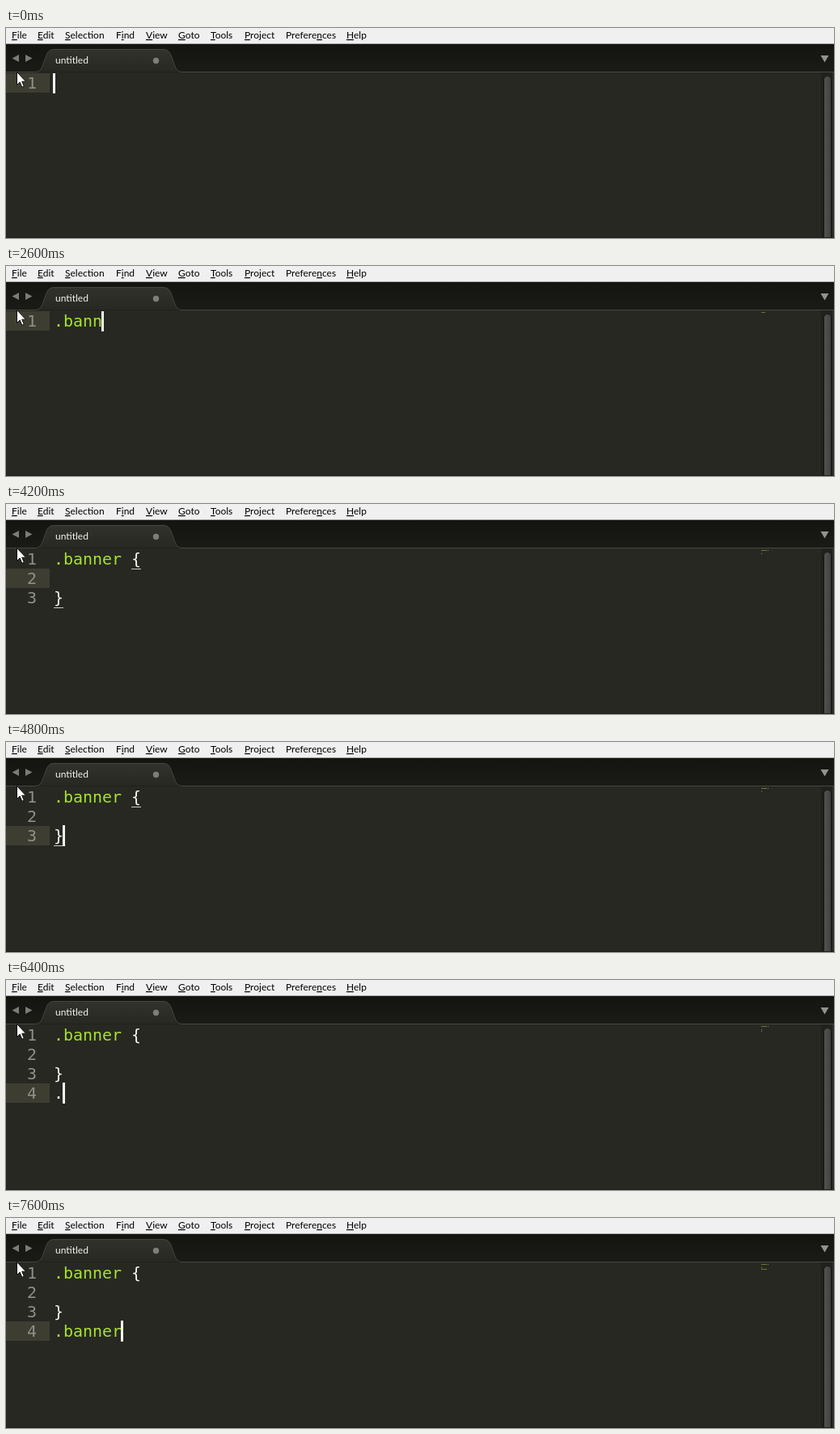
An HTML page that plays this animation: 1024 px wide and 260 px high, repeating every 8000 ms.

```html
<!DOCTYPE html>
<html>
<head>
<meta charset="utf-8">
<style>
html, body { margin: 0; width: 100%; height: 100%; overflow: hidden; background: #272822; }
svg { display: block; }
text { white-space: pre; }
.ui { font: 12px Lato, "Open Sans", sans-serif; }
.code { font: 20px "DejaVu Sans Mono", "Noto Sans Mono", monospace; }
</style>
</head>
<body>
<svg width="1024" height="260" viewBox="0 0 1024 260">
  <defs>
    <linearGradient id="strip" x2="0" y2="1">
      <stop stop-color="#141510"/><stop offset="1" stop-color="#1a1b16"/>
    </linearGradient>
    <linearGradient id="tab" x2="0" y2="1">
      <stop stop-color="#31322c"/><stop offset="1" stop-color="#272822"/>
    </linearGradient>
    <linearGradient id="thumb">
      <stop stop-color="#545552"/><stop offset="1" stop-color="#40413e"/>
    </linearGradient>
  </defs>
  <rect width="1024" height="19" fill="#f0f0f0"/>
  <rect y="19" width="1024" height="1" fill="#a0a0a0"/>
  <g id="menu" class="ui" fill="#000"></g>

  <rect y="20" width="1024" height="35" fill="url(#strip)"/>
  <path d="M0 54.500H36C44 54.500 45 47 48 39C51 31 52 26.500 60 26.500H194C202 26.500 203 31 206 39C209 47 210 54.500 218 54.500H1024" fill="url(#tab)" stroke="#45463f"/>
  <text class="ui" x="61" y="44" fill="#f4f4f0">untitled</text>
  <circle cx="185.500" cy="40.500" r="3.700" fill="#7d7e78"/>
  <path d="M16 33V42L7.500 37.500ZM24 33V42L32.500 37.500Z" fill="#7b7c77"/>
  <path d="M1007.500 34H1017.500L1012.500 42.500Z" fill="#92938e"/>

  <rect x="1008" y="55" width="16" height="205" fill="#20211c"/>
  <rect x="1011.500" y="59.500" width="9" height="220" rx="4" fill="url(#thumb)" stroke="#151612"/>
  <rect x="1022" y="55" width="2" height="205" fill="#2e2e32"/>
  <rect y="259" width="1024" height="1" fill="#1d1e19"/>

  <g id="editor"></g>
  <path d="M13.500 54.500V70.500L17.200 67L19.800 73.300L22.300 72.200L19.700 66.200H24.500Z" fill="#fff" stroke="#111"/>
</svg>
<script>
const LOOP = 8000, TOP = 56, LEFT = 59, ROW = 24, COL = 12;
const GREEN = '#a6e22e', WHITE = '#f8f8f2';

// x, label; & marks the underlined letter
const menu = [[7, '&File'], [39, '&Edit'], [73, '&Selection'], [136, 'F&ind'], [173, '&View'],
  [213, '&Goto'], [253, '&Tools'], [295, '&Project'], [346, 'Prefere&nces'], [421, '&Help']];
document.getElementById('menu').innerHTML = menu.map(([x, label]) =>
  `<text x="${x}" y="13">${label.replace(/&(.)/, '<tspan text-decoration="underline">$1</tspan>')}</text>`).join('');

const FAINT = 0.08, block = '.banner {\n\n}';
// start time, text, caret row, caret column, caret opacity
const states = [
  [0, '', 0, 0, 1], [200, '', 0, 0, FAINT], [400, '', 0, 0, 0],
  [1000, '.', 0, 1, 1], [1400, '.', 0, 1, FAINT],
  ...[2, 3, 4, 5, 6, 7].map((n, i) => [2000 + i * 200, '.banner'.slice(0, n), 0, n, 1]),
  [3400, '.banner', 0, 7, FAINT], [3600, '.banner', 0, 7, 0],
  [3800, block, 1, 2, 1], [4200, block, 1, 2, 0],
  [4800, block, 2, 1, 1], [5200, block, 2, 1, FAINT], [5400, block, 2, 1, 0],
  [5600, block + '\n', 3, 0, 1], [6000, block + '\n', 3, 0, FAINT], [6200, block + '\n', 3, 0, 0],
  ...[[6400, 1], [6600, 2], [6800, 3], [7200, 5], [7400, 6], [7600, 7]].map(([t, n]) =>
    [t, block + '\n' + '.banner'.slice(0, n), 3, n, 1])
];

const rect = (x, y, w, h, fill, alpha = 1) =>
  `<rect x="${x}" y="${y}" width="${w}" height="${h}" fill="${fill}" opacity="${alpha}"/>`;
const code = (x, row, fill, str) =>
  `<text class="code" x="${x}" y="${TOP + row * ROW + 19}" fill="${fill}">${str}</text>`;

function render([, text, row, col, alpha]) {
  const inBlock = row === 1 || row === 2;
  let out = rect(0, TOP + row * ROW, 54, ROW, '#3e3d32');
  text.split('\n').forEach((line, i) => {
    out += code(26, i, '#8f908a', i + 1);
    [...line].forEach((ch, c) => {
      if (ch === ' ') return;
      const brace = /[{}]/.test(ch);
      const fill = brace || line === '.' ? WHITE : GREEN;
      const x = LEFT + c * COL;
      out += code(x, i, fill, ch) + rect(934 + c, 57 + i * 2, 1, 1, fill, 0.45);
      if (inBlock && brace) out += rect(x, TOP + (i + 1) * ROW, COL, 1, '#c8c8bc');
    });
  });
  const y = TOP + row * ROW, caretTop = Math.max(TOP, y - 1);
  return out + rect(58 + col * COL, caretTop, 3, y + 25 - caretTop, WHITE, alpha);
}

const editor = document.getElementById('editor');
let shown;
function tick() {
  const t = performance.now() % LOOP;
  const state = states.findLast(s => s[0] <= t);
  if (state !== shown) editor.innerHTML = render(shown = state);
  requestAnimationFrame(tick);
}
tick();
</script>
</body>
</html>
```
